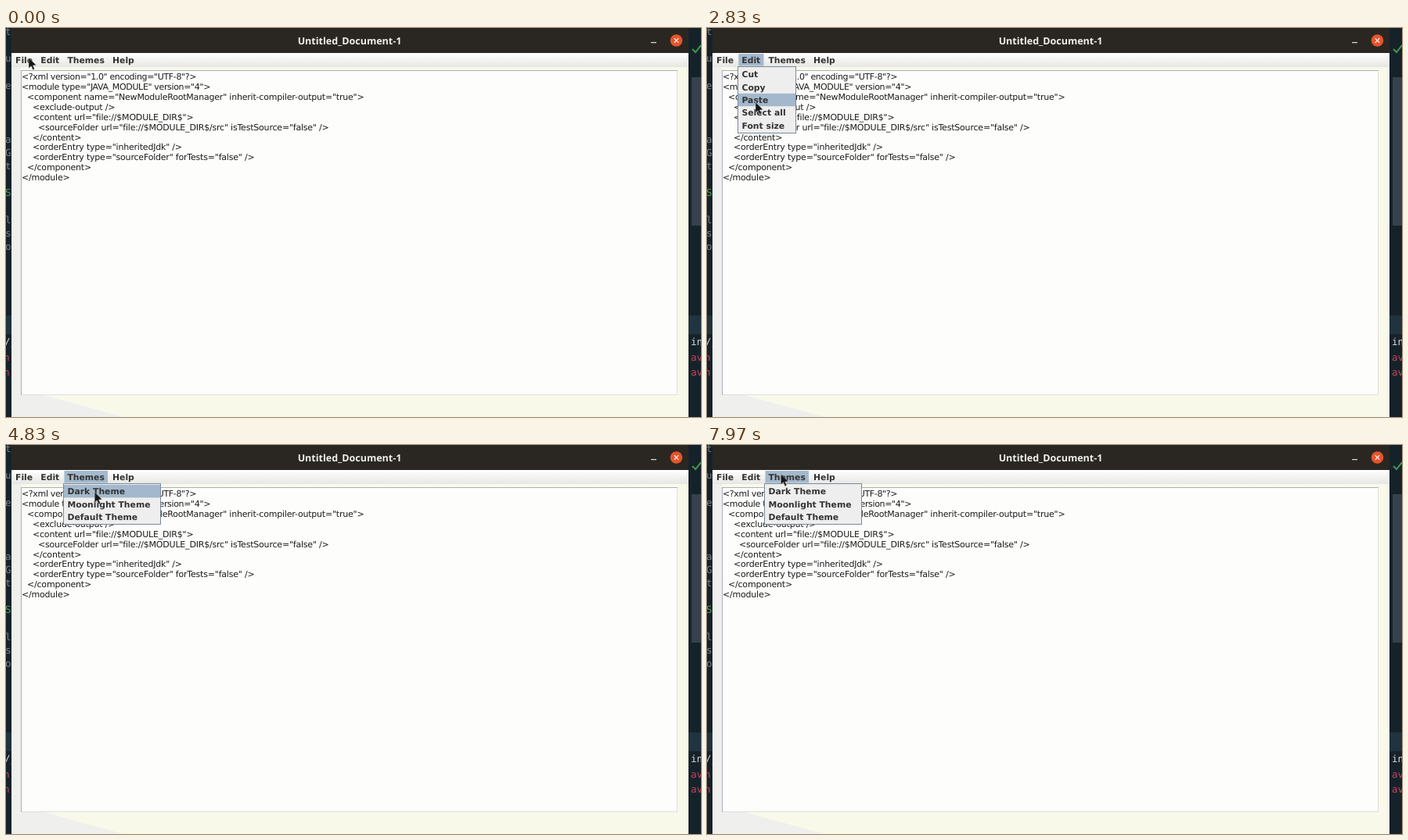
These frames come from a looping animation (888x498 px, 8000 ms). An HTML page with a canvas:

```html
<!DOCTYPE html>
<html lang="en">
<head>
<meta charset="utf-8">
<title>Text editor menus</title>
<style>
html, body { margin: 0; width: 100%; height: 100%; overflow: hidden; background: #16222a; }
canvas { display: block; }
</style>
</head>
<body>
<canvas id="stage" width="888" height="498"></canvas>
<script>
const ctx = document.getElementById('stage').getContext('2d');
ctx.textRendering = 'geometricPrecision';

const LOOP = 8000, FIRST_CLICK = 350;
const BODY = '11px "DejaVu Sans", sans-serif';
const BOLD = 'bold 10.8px "DejaVu Sans", sans-serif';
const CODE = '12.5px "DejaVu Sans Mono", monospace';
const BAR_END = 49, ROW = 16.4, FIRST_ROW = 51;
const INK = '#333333', SELECTED = '#a3b8cc', BORDER = '#7a8a99';

const doc = `<?xml version="1.0" encoding="UTF-8"?>
<module type="JAVA_MODULE" version="4">
  <component name="NewModuleRootManager" inherit-compiler-output="true">
    <exclude-output />
    <content url="file://$MODULE_DIR$">
      <sourceFolder url="file://$MODULE_DIR$/src" isTestSource="false" />
    </content>
    <orderEntry type="inheritedJdk" />
    <orderEntry type="sourceFolder" forTests="false" />
  </component>
</module>`.split('\n');

const menus = layout({
  File: ['Open', 'New', 'Save', 'Exit'],
  Edit: ['Cut', 'Copy', 'Paste', 'Select all', 'Font size'],
  Themes: ['Dark Theme', 'Moonlight Theme', 'Default Theme'],
  Help: ['Video Reference', 'Documentation']
});

// pointer stops: time, x, y
const stops = [
  [0, 29, 38], [500, 29, 41], [1270, 45, 70], [1850, 42, 106], [2400, 36, 44],
  [2500, 54, 43], [2830, 62, 95], [3150, 66, 122], [3650, 66, 43], [4100, 103, 62],
  [4500, 108, 92], [5050, 116, 43], [5300, 140, 43], [5730, 152, 76],
  [6300, 146, 42], [7200, 29, 42], [7500, 29, 42], [LOOP, 95, 37]
];

function layout(tree) {
  ctx.font = BOLD;
  const width = s => ctx.measureText(s).width;
  let x = 7.5;
  return Object.entries(tree).map(([name, items]) => {
    const menu = { name, items, x, w: width(name) + 10.2 };
    menu.popW = Math.round(Math.max(...items.map(width)) + 19);
    menu.popH = Math.round(items.length * ROW + 3.5);
    x += menu.w;
    return menu;
  });
}

function rect(x, y, w, h, fill) {
  ctx.fillStyle = fill;
  ctx.fillRect(x, y, w, h);
}

function text(str, x, y, font, fill, gap = 0) {
  ctx.font = font;
  ctx.letterSpacing = gap + 'px';
  ctx.fillStyle = fill;
  ctx.fillText(str, x, y);
}

function trace(points) {
  ctx.beginPath();
  points.forEach(([x, y]) => ctx.lineTo(x, y));
}

function stroke(points, color, width) {
  trace(points);
  ctx.strokeStyle = color;
  ctx.lineWidth = width;
  ctx.stroke();
}

function fade(y0, y1, from, to) {
  const g = ctx.createLinearGradient(0, y0, 0, y1);
  g.addColorStop(0, from);
  g.addColorStop(1, to);
  return g;
}

function pointerAt(t) {
  const i = stops.findIndex(s => s[0] > t);
  const [t0, x0, y0] = stops[i - 1], [t1, x1, y1] = stops[i];
  const u = (t - t0) / (t1 - t0), e = u * u * (3 - 2 * u);
  return [x0 + (x1 - x0) * e, y0 + (y1 - y0) * e];
}

// The open menu is the title the pointer touched last.
function openMenu(t) {
  for (let s = t; s > FIRST_CLICK; s -= 15) {
    const [x, y] = pointerAt(s);
    if (y < BAR_END) return menus.find(m => x < m.x + m.w);
  }
}

function drawBackdrop() {
  rect(0, 0, 888, 498, '#16222a');
  rect(0, 368, 888, 24, '#20333f');
  rect(876, 63, 12, 190, '#36414d');
  const scraps = 't,,u,,e,,,,an,G,tc,,S,,l,s,or'.split(',');
  scraps.forEach((s, i) => text(s, -1, 9 + i * 17.2, CODE, s === 'S' ? '#4f9a52' : '#77838a'));
  text('/j', -2, 406, CODE, '#d6dade');
  text('in', 875, 406, CODE, '#d6dade');
  for (const y of [426, 445]) {
    text('n', -3, y, CODE, '#c24458');
    text('av', 875, y, CODE, '#c24458');
  }
  stroke([[877, 27], [881, 31], [888, 22]], '#3f9a4a', 2);
}

function drawTitleBar() {
  rect(7, 0, 865, 32, '#2a2722');
  ctx.textAlign = 'center';
  text('Untitled_Document-1', 439, 21, 'bold 12.5px "Open Sans", sans-serif', '#f2f1ec');
  ctx.textAlign = 'left';
  rect(824, 18, 7, 1.2, '#dedcd6');
  ctx.beginPath();
  ctx.arc(856.5, 16, 7.8, 0, Math.PI * 2);
  ctx.fillStyle = '#e6542a';
  ctx.fill();
  for (const d of [-2.8, 2.8]) stroke([[856.5 - d, 13.2], [856.5 + d, 18.8]], '#ffffff', 1.2);
}

function drawEditor() {
  rect(7, 32, 865, 466, '#f9f9ea');
  trace([[7, 50], [19, 50], [19, 462], [150, 498], [7, 498]]);
  ctx.fillStyle = '#efefed';
  ctx.fill();
  rect(7, 32, 865, 18, fade(32, 50, '#ffffff', '#e6e7e3'));
  rect(19, 54, 839, 416, '#a9b2bc');
  rect(20, 55, 838, 415, '#dde0e0');
  rect(20, 55, 837, 414, '#fdfdfc');

  doc.forEach((line, i) => {
    const str = line.trimStart(), indent = line.length - str.length;
    // the two header lines are set tighter
    text(str, 20 + indent * 3.5, 66 + i * 12.92, BODY, '#1c1c1c', i < 2 ? -.35 : -.2);
  });
}

function drawMenus(open, py) {
  if (open) rect(open.x + .5, 33, open.w - 2, 15.5, SELECTED);
  for (const m of menus) text(m.name, m.x + 4.5, 44.5, BOLD, INK);
  if (!open) return;

  const { items, popW, popH } = open, x = Math.floor(open.x);
  rect(x, BAR_END, popW, popH, BORDER);
  rect(x + 1, BAR_END + 1, popW - 2, popH - 2, '#eeeeee');
  const hot = Math.floor((py - FIRST_ROW) / ROW);
  if (items[hot]) rect(x + 1, FIRST_ROW + hot * ROW, popW - 2, ROW, SELECTED);
  items.forEach((item, i) => text(item, x + 5.5, 63.2 + i * ROW, BOLD, INK));
}

function drawPointer(x, y) {
  ctx.save();
  ctx.translate(x, y);
  trace([[0, 0], [0, 13.5], [3.2, 10.8], [5.3, 15.6], [7.5, 14.6], [5.4, 10], [9.6, 9.6]]);
  ctx.closePath();
  ctx.fillStyle = '#171717';
  ctx.fill();
  ctx.strokeStyle = 'rgba(225,225,225,.65)';
  ctx.lineWidth = .7;
  ctx.stroke();
  ctx.restore();
}

const start = performance.now();
function tick() {
  const t = (performance.now() - start) % LOOP;
  const [x, y] = pointerAt(t);
  drawBackdrop();
  drawTitleBar();
  drawEditor();
  drawMenus(openMenu(t), y);
  drawPointer(x, y);
  requestAnimationFrame(tick);
}
tick();
</script>
</body>
</html>
```
